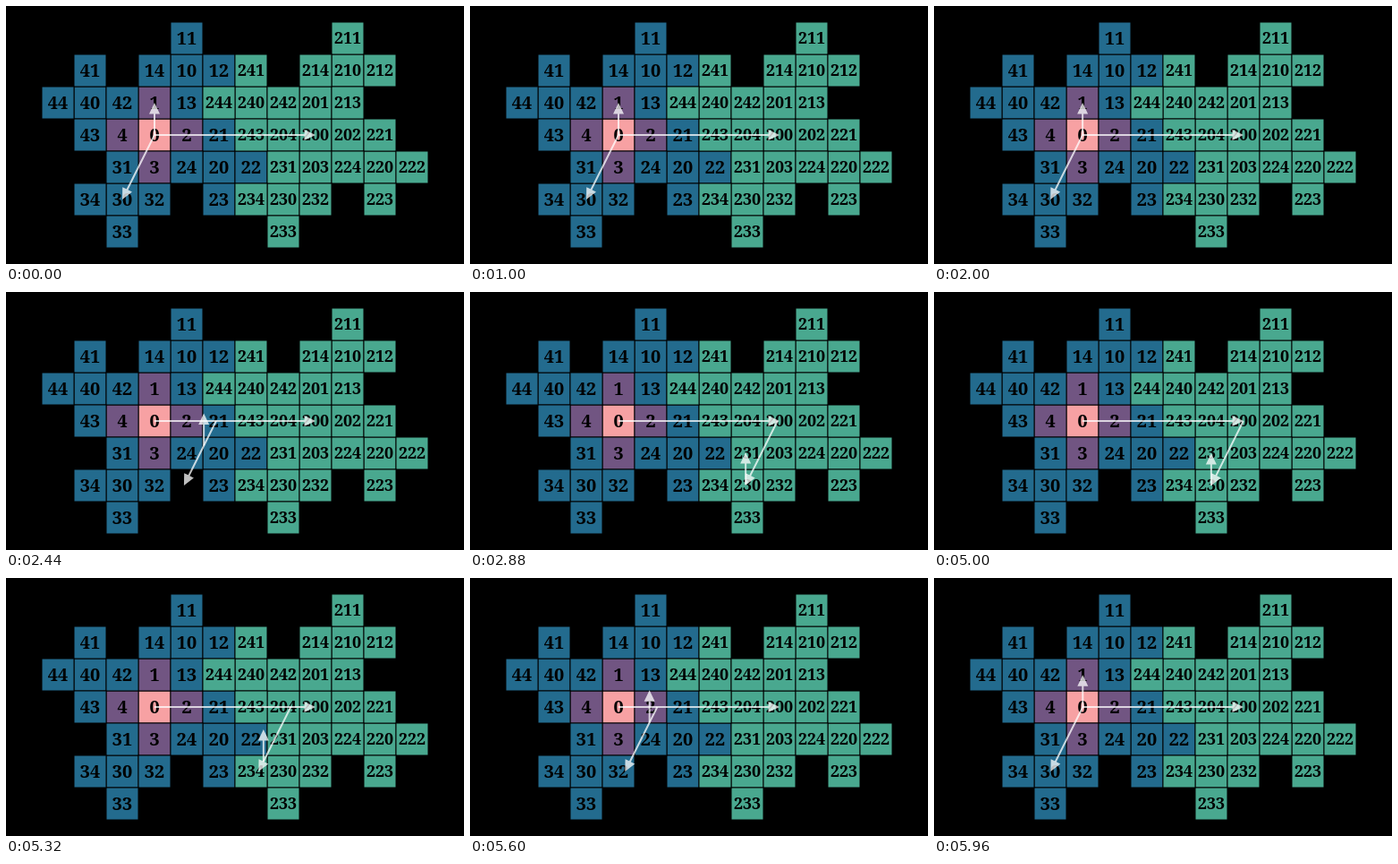
Recreate the animation shown at these times as an HTML page. Size 512 by 288 pixels, loop 6000 ms.

```html
<!DOCTYPE html>
<html lang="en">
<head>
<meta charset="utf-8">
<title>Vector sum on a base-5 grid</title>
<style>
  html, body { margin: 0; width: 100%; height: 100%; overflow: hidden; background: #000; }
  svg { display: block; width: 512px; height: 288px; }
  rect { stroke: #000; stroke-width: 1; }
  text { font: bold 20px "Noto Serif", "Liberation Serif", serif; text-anchor: middle; }
  .long { font-size: 18px; }
  .arrow { fill: #fff; opacity: .75; }
</style>
</head>
<body>
<svg viewBox="0 0 512 288"></svg>
<script>
const svg = document.querySelector('svg');
const CELL = 36, X0 = 166, Y0 = 144, LOOP = 6000;

function add(tag, attrs, content = '') {
  const el = document.createElementNS('http://www.w3.org/2000/svg', tag);
  for (const key in attrs) el.setAttribute(key, attrs[key]);
  el.textContent = content;
  return svg.appendChild(el);
}

// Turn a grid vector clockwise by quarter turns.
function turn([x, y], times) {
  while (times-- > 0) [x, y] = [-y, x];
  return [x, y];
}

// Each nonzero base-5 digit is a quarter-turned copy of its place's unit vector.
function place(hundreds, tens, ones) {
  const a = tens ? turn([1, -2], tens - 1) : [0, 0];
  const b = ones ? turn([0, -1], ones - 1) : [0, 0];
  return [X0 + CELL * (a[0] + b[0] + (hundreds ? 5 : 0)), Y0 + CELL * (a[1] + b[1])];
}

function color(n) {
  return n === 0 ? '#f7a1a3' : n < 5 ? '#715582' : n < 100 ? '#236b8e' : '#49a88f';
}

for (const hundreds of [0, 2])
  for (let tens = 0; tens < 5; tens++)
    for (let ones = 0; ones < 5; ones++) {
      const n = hundreds * 100 + tens * 10 + ones;
      const [x, y] = place(hundreds, tens, ones);
      const size = n < 100 ? 20 : 18;
      add('rect', { x: x - CELL / 2, y: y - CELL / 2, width: CELL, height: CELL, fill: color(n) });
      add('text', { x, y: y + size * .357, class: n < 100 ? '' : 'long' }, n);
    }

// An arrow along the x axis, rotated to its direction; slide is its full displacement.
function arrow(dx, dy, slide) {
  const len = Math.hypot(dx, dy), neck = len - 12.5;
  const el = add('path', {
    class: 'arrow',
    d: `M0-1H${neck}V-6L${len} 0L${neck} 6V1H0Z`
  });
  const angle = Math.atan2(dy, dx) * 180 / Math.PI;
  return s => el.setAttribute('transform',
    `translate(${X0 + slide[0] * s} ${Y0 + slide[1] * s}) rotate(${angle})`);
}

const arrows = [
  arrow(180, 0, [0, 0]),
  arrow(-36, 72, [180, 0]),
  arrow(0, -36, [144, 72])
];

// Sigmoid easing, rescaled to run exactly from 0 to 1.
function smooth(t) {
  const sigmoid = v => 1 / (1 + Math.exp(-v));
  const edge = sigmoid(-5);
  t = Math.min(1, Math.max(0, t));
  return (sigmoid(10 * (t - .5)) - edge) / (1 - 2 * edge);
}

function draw(now) {
  const t = now % LOOP;
  const s = smooth((t - 1988) / 1000) - smooth((t - 4988) / 1000);
  arrows.forEach(move => move(s));
}

const start = performance.now();
function tick() {
  draw(performance.now() - start);
  requestAnimationFrame(tick);
}
tick();
</script>
</body>
</html>
```
